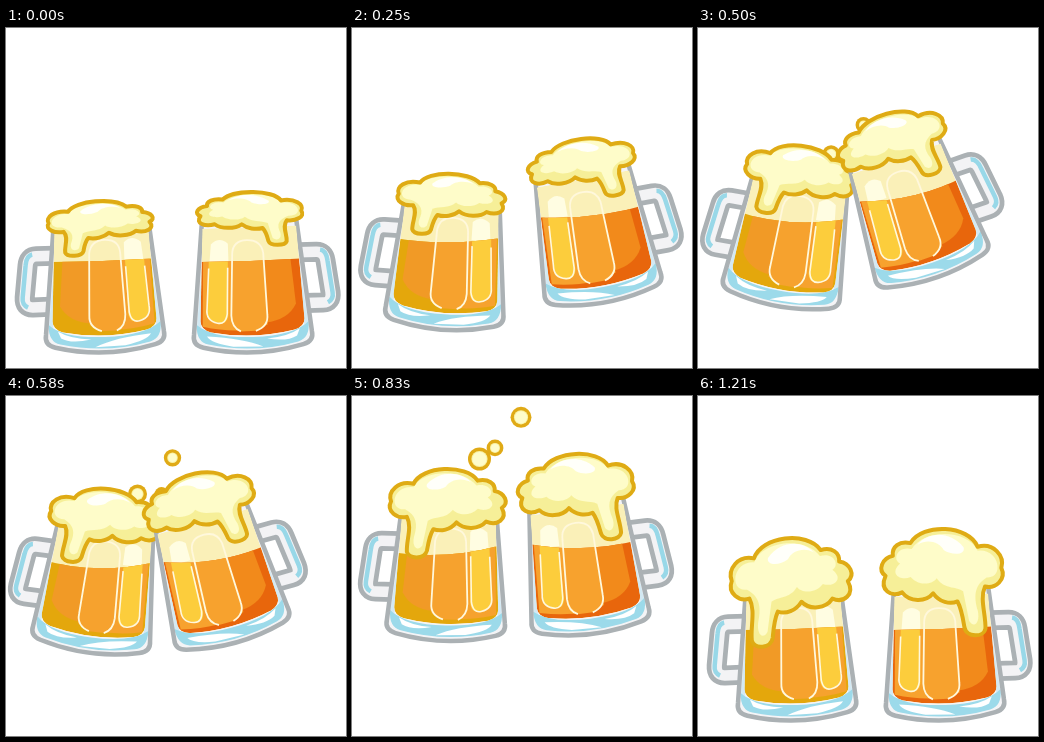
These frames come from a looping animation (340x340 px, 1250 ms). An HTML page with a canvas:

```html
<!DOCTYPE html>
<html>
<head>
<meta charset="utf-8">
<style>
html, body { margin: 0; background: #fff; overflow: hidden; }
canvas { display: block; }
</style>
</head>
<body>
<canvas id="stage" width="340" height="340"></canvas>
<script>
const ctx = document.getElementById('stage').getContext('2d');
const LOOP = 1250, STEPS = 24, CLINK = 10, LAND = 20;

const shapes = {
  handle: 'M-48-23H-66Q-74-23-75-14L-79 18Q-80 28-71 28H-54',
  handleTint: 'M-70-25Q-76-24-77-14L-81 18Q-82 25-76 28',
  glass: 'M-47-58L-59 56Q-61 66-50 69Q0 82 50 69Q61 66 59 56L47-58Z',
  sideTint: 'M-49-10L-56 50L-52 54L-47-10ZM49-10L56 50L52 54L47-10Z',
  base: 'M-56 46Q-57 63-45 66Q0 77 45 66Q57 63 56 46Q40 60 0 60Q-42 60-56 46Z',
  baseShine: 'M-10 70Q10 61 46 58Q42 65 20 69ZM-47 53Q-35 61-14 62Q-34 66-44 60Z',
  liquid: 'M-47-50L-52 43Q-52 51-42 54Q0 63 42 54Q52 51 52 43L47-50Z',
  leftFacet: 'M-38-40L-44 28Q-36 44-13 46L-13-40Z',
  arch: 'M-3 54Q-16 50-15 38L-13-24Q-11-37 3-37Q17-37 18-24L21 38Q21 50 12 54',
  strip: 'M22-40L24 38Q26 47 33 45Q47 42 45 30L40-40Z',
  stripLine: 'M23-10L25 36Q27 47 35 45Q47 42 45 30L42-10',
  creamShine: 'M22-16V-34Q30-42 39-34L41-16Z',
  foam: 'M-48-48C-58-45-70-54-65-66C-69-78-58-92-42-88C-34-110 12-114 25-94C36-97 44-91 43-82' +
    'C54-80 59-68 51-62C58-48 46-40 35-45C28-35 12-34 4-43C-2-34-12-31-20-34C-24-26-25-16-26-8' +
    'C-28 3-45 3-47-6C-48-20-42-36-48-48Z',
  foamLight: 'M-50-57C-68-55-64-86-42-84C-32-106 10-108 24-88C38-92 44-78 36-74C48-64 36-56 26-60' +
    'C18-50 4-52 0-58C-8-46-18-50-26-44L-31-14C-36-6-42-12-40-24C-36-40-38-50-50-57Z',
  foamShine: 'M-28-88C-14-106 8-104 18-92C8-98-4-94-8-86C-16-80-30-80-28-88Z'
};
for (const name in shapes) shapes[name] = new Path2D(shapes[name]);

const mugs = [
  { side: 1, x: 97, pull: -4, tilt: 12, foamLift: 0, rise: [[0, 0], [10, 45], [12, 67], [18, 82]],
    edge: '#e4a70c', facet: '#f19a26', body: '#f6a22e' },
  { side: -1, x: 245, pull: -35, tilt: -17, foamLift: 9, rise: [[0, 0], [5, 49], [10, 71], [18, 88]],
    edge: '#e8660c', facet: '#f28a1b', body: '#f7a22e' }];

const drops = [
  { x: 169, drift: 0.5, apex: 17.5, top: 21, fall: 1.35, size: 9 },
  { x: 127.5, drift: -0.8, apex: 18, top: 62, fall: 1, size: 10 },
  { x: 143, drift: -2.5, apex: 17.8, top: 51, fall: 1.4, size: 7 }];

function along(points, t) {
  const i = points.findIndex(p => p[0] > t);
  if (i < 0) return points[points.length - 1][1];
  const [t0, v0] = points[i - 1], [t1, v1] = points[i];
  return v0 + (v1 - v0) * (t - t0) / (t1 - t0);
}

function fill(path, color) {
  ctx.fillStyle = color;
  ctx.fill(path);
}

function stroke(path, color, width) {
  ctx.strokeStyle = color;
  ctx.lineWidth = width;
  ctx.stroke(path);
}

function drawBeer({ edge, facet, body }, swing) {
  ctx.save();
  ctx.clip(shapes.liquid);
  fill(shapes.liquid, '#faf0b8');
  fill(shapes.creamShine, '#fffde2');
  ctx.save();
  ctx.clip(new Path2D(`M-60 ${-17 + 6 * swing}Q0 ${-15 + 14 * swing} 60 ${-17 - 9 * swing}V80H-60Z`));
  fill(shapes.liquid, edge);
  fill(new Path2D('M-13-50L-15 48Q10 58 50 48L46-50Z'), body);
  fill(shapes.leftFacet, facet);
  fill(shapes.arch, body);
  fill(shapes.strip, '#fccd3c');
  ctx.restore();
  stroke(shapes.arch, '#fff8dc', 1.8);
  stroke(shapes.stripLine, '#fff8dc', 1.6);
  ctx.restore();
}

function drawFoam(growth, lift) {
  const matrix = new DOMMatrix().translate(4, -45 - lift)
    .scale(0.87 + 0.13 * growth, 0.5 + 0.5 * growth).translate(0, 45);
  const grown = path => {
    const result = new Path2D();
    result.addPath(path, matrix);
    return result;
  };
  const foam = grown(shapes.foam);
  fill(foam, '#f6ef98');
  fill(grown(shapes.foamLight), '#fefcc9');
  fill(grown(shapes.foamShine), '#fffffa');
  stroke(foam, '#dfab14', 4);
}

function drawMug(mug, step) {
  const lean = Math.max(0, 1 - Math.abs(step / CLINK - 1));
  const swing = Math.sin(Math.PI * step / STEPS);
  const drop = Math.min(1, (STEPS - step) / (STEPS - LAND)) ** 1.7;
  ctx.save();
  ctx.translate(mug.x + mug.pull * swing ** 4, 249 - along(mug.rise, step) * drop);
  ctx.rotate((mug.tilt * lean - 2) * Math.PI / 180);
  ctx.scale(mug.side, 1);
  stroke(shapes.handle, '#abb1b4', 20);
  stroke(shapes.handle, '#f3f3f5', 10.5);
  stroke(shapes.handleTint, '#98d8e8', 4.5);
  fill(shapes.glass, '#f4f4f6');
  fill(shapes.sideTint, '#d3e9f3');
  fill(shapes.base, '#9cdaea');
  fill(shapes.baseShine, '#fff');
  stroke(shapes.glass, '#abb1b4', 4.5);
  drawBeer(mug, swing);
  drawFoam((step / STEPS) ** 1.2, mug.foamLift);
  ctx.restore();
}

function drawDrops(step) {
  if (step < 8 || step > 22) return;
  const grow = Math.min(0.35 + 0.04 * step, 0.19 * (23 - step));
  // Outlines first, so that touching drops merge
  const layer = (inset, color) => {
    for (const { x, drift, apex, top, fall, size } of drops) {
      const disc = new Path2D();
      disc.arc(x + drift * (step - 17), top + fall * (step - apex) ** 2,
        Math.max(0, size * grow - inset), 0, 2 * Math.PI);
      fill(disc, color);
    }
  };
  layer(-1.2, '#e0aa16');
  layer(2.2, '#f9f2a4');
  layer(3.2, '#fefccb');
}

function draw(now) {
  // 25 poses spread over 30 ticks, so every sixth tick repeats a pose
  const tick = Math.min(29, Math.floor((now % LOOP + 4) * 30 / LOOP));
  const step = tick - Math.floor((tick + 3) / 6);
  ctx.clearRect(0, 0, 340, 340);
  ctx.lineJoin = 'round';
  drawDrops(step);
  for (const mug of mugs) drawMug(mug, step);
}

const start = performance.now();
function loop() {
  draw(performance.now() - start);
  requestAnimationFrame(loop);
}
loop();
</script>
</body>
</html>
```
